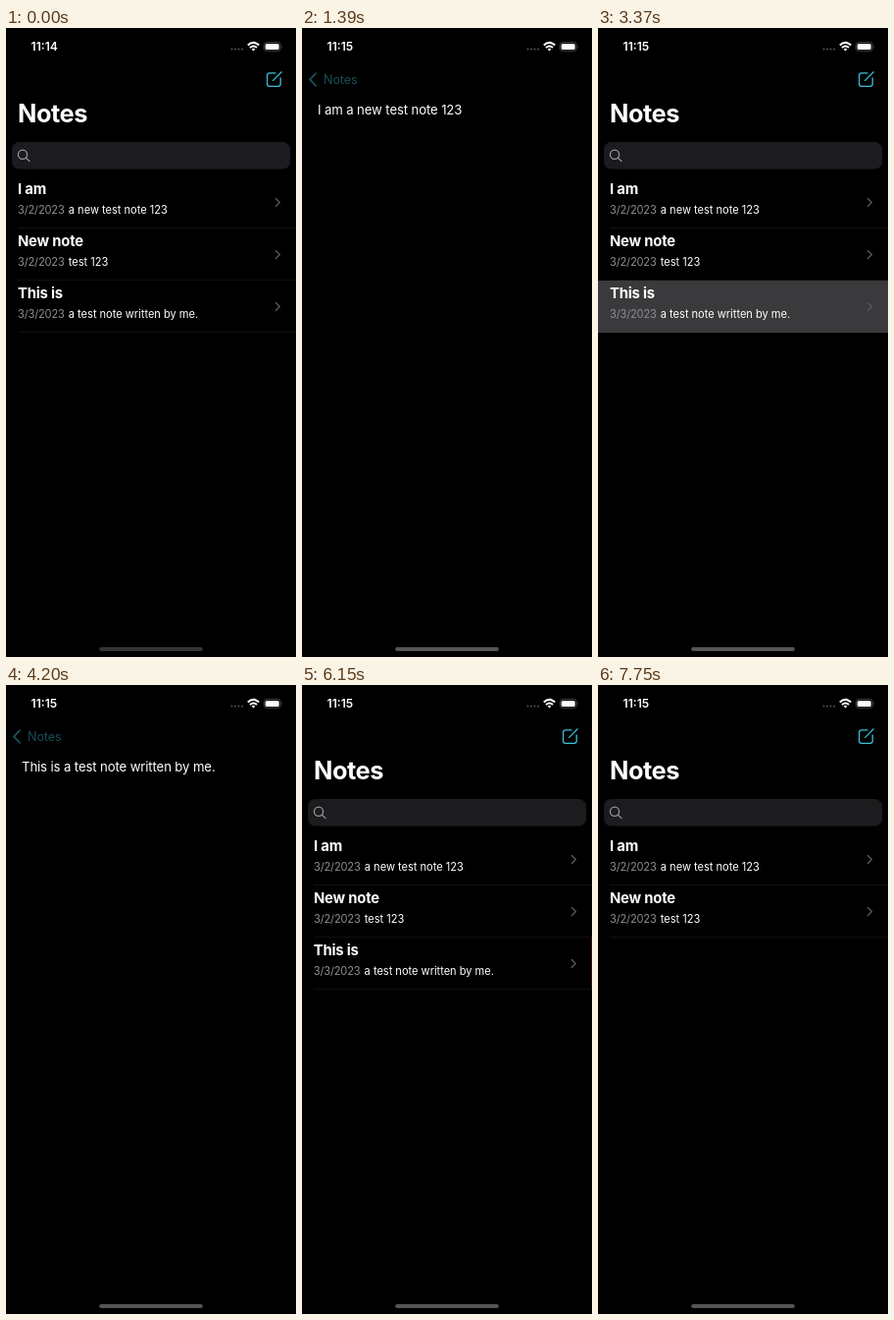
Animation, 296 px wide and 640 px high, one loop 8 s. Source, as an HTML page:

```html
<!DOCTYPE html>
<html lang="en">
<head>
<meta charset="utf-8">
<title>Notes</title>
<style>
  html, body { margin: 0; width: 100%; height: 100%; overflow: hidden; background: #000; }
  svg { display: block; }
  text { font-family: Inter, "Liberation Sans", sans-serif; fill: #fff; white-space: pre; }
  .large { font-size: 25.4px; font-weight: 700; letter-spacing: -.018em; }
  .nav { font-size: 12.6px; letter-spacing: -.008em; fill: #3cc4dc; }
  .head { font-size: 14.8px; font-weight: 700; letter-spacing: -.012em; }
  .detail { font-size: 11.1px; letter-spacing: -.002em; }
  .date { font-size: 11.1px; letter-spacing: -.016em; fill: #8e8e93; }
  .body { font-size: 13.2px; letter-spacing: -.01em; }
  .clock { font-size: 12.1px; font-weight: 600; }
  .action { font-size: 12.6px; letter-spacing: -.008em; text-anchor: middle; }
  .line { fill: none; stroke-linecap: round; stroke-linejoin: round; }
  .tint { stroke: #3cc4dc; }
</style>
</head>
<body>
<svg width="296" height="640" viewBox="0 0 296 640">
  <rect width="296" height="640"/>
  <g id="list">
    <rect x="6" y="116" width="284" height="27.5" rx="7.5" fill="#1c1c1e"/>
    <g class="line" stroke="#96969b" stroke-width="1.3">
      <circle cx="17" cy="128.7" r="4.6"/>
      <path d="M20.4 132.1L24 135.6"/>
    </g>
    <g id="rows"></g>
  </g>
  <g id="page">
    <rect width="296" height="640"/>
    <text id="body" class="body" x="16" y="88"></text>
  </g>
  <text id="large" class="large">Notes</text>
  <g id="back">
    <path id="arrow" class="line tint" stroke-width="1.9" d="M14.2 46.2L8 52.5L14.2 58.8"/>
    <text id="label" class="nav">Notes</text>
  </g>
  <g id="compose" class="line tint" stroke-width="1.25">
    <path d="M275 45.8H269Q266.6 45.8 266.6 48.2V57Q266.6 59.4 269 59.4H277.8Q280.2 59.4 280.2 57V50.8"/>
    <path d="M272.6 53.4L281.2 44.8"/>
  </g>
  <text id="clock" class="clock" x="25.6" y="23.1"></text>
  <g fill="#4a4a4d">
    <circle cx="230.5" cy="21.6" r="1.15"/>
    <circle cx="234" cy="21.6" r="1.15"/>
    <circle cx="237.5" cy="21.6" r="1.15"/>
    <circle cx="241" cy="21.6" r="1.15"/>
  </g>
  <g class="line" stroke="#fff" stroke-width="2" style="stroke-linecap:butt">
    <path d="M246.8 17.5Q252.5 12.3 258.2 17.5"/>
    <path d="M249 20Q252.5 16.900 256 20"/>
  </g>
  <path d="M250.700 21.500Q252.500 20 254.300 21.500L252.500 23.400Z" fill="#fff"/>
  <rect x="263.400" y="14.600" width="16.800" height="8.600" rx="2.600" fill="none" stroke="#5c5c5e" stroke-width=".8"/>
  <rect x="264.700" y="15.900" width="14" height="6" rx="1.500" fill="#fff"/>
  <path d="M281.200 17.500Q282.400 18.900 281.200 20.300Z" fill="#5c5c5e"/>
  <rect id="home" x="95.200" y="630.100" width="105.600" height="3.800" rx="1.900"/>
</svg>
<script>
const LOOP = 8000, TOP = 151, ROW = 53, ACTION = 56;

const notes = [
  ['I am', '3/2/2023', 'a new test note 123'],
  ['New note', '3/2/2023', 'test 123'],
  ['This is', '3/3/2023', 'a test note written by me.']
];

// moments at which the screen refreshes
const ticks = [0, 500, 610, 730, 840, 950, 1040, 1390, 1620, 1730, 1850, 1960,
  3370, 3480, 3590, 3710, 3820, 4200, 4310, 4420, 4540, 4650, 4760,
  6150, 6270, 6380, 6490, 6600, 6720, 6830, 6940, 7050, 7150, 7750];

// page changes: first visible tick, spring start, row, direction
const moves = [
  { at: 500, start: 530, row: 0, push: true },
  { at: 1620, start: 1590, row: 0, push: false },
  { at: 3370, start: 3385, row: 2, push: true },
  { at: 4310, start: 4290, row: 2, push: false }
];

const $ = id => document.getElementById(id);
const lerp = (a, b, k) => a + (b - a) * k;
const clamp = v => Math.max(0, Math.min(1, v));
const shift = (el, x, y = 0, s = 1) => el.setAttribute('transform', `translate(${x} ${y}) scale(${s})`);
const fade = (el, v) => el.setAttribute('opacity', clamp(v));
const within = (t, a, b) => t >= a && t < b;

function spring(ms, rate) {
  const k = Math.max(0, ms) / 1000 * rate;
  return 1 - (1 + k) * Math.exp(-k);
}

$('rows').innerHTML = notes.map(([head, date, detail], i) => `
  <g class="row" transform="translate(0 ${TOP + i * ROW})">
    <g class="action-box">
      <rect x="296" width="${ACTION}" height="${ROW}" fill="#ff453a"/>
      <text class="action" x="${296 + ACTION / 2}" y="31">Delete</text>
    </g>
    <path d="M12 52.5H296" stroke="#101011"/>
    <rect class="glow" width="296" height="${ROW}" fill="#3a3a3c"/>
    <g class="cell">
      <text class="head" x="12" y="18.3">${head}</text>
      <text class="date" x="12" y="38.2">${date}</text>
      <text class="detail" x="63.8" y="38.2">${detail}</text>
      <path class="line" stroke="#545458" stroke-width="1.5" d="M275.4 22.5L279.4 26.5L275.4 30.5"/>
    </g>
  </g>`).join('');

const rows = [...document.querySelectorAll('.row')];
const glows = [...document.querySelectorAll('.glow')];
const lastCell = rows[2].querySelector('.cell');
const lastAction = rows[2].querySelector('.action-box');

function draw(t) {
  const move = moves.filter(m => m.at <= t).pop();
  let open = 0, glow = 0;
  if (move) {
    const k = spring(t - move.start, 18.26);
    open = move.push ? k : 1 - k;
    glow = move.push ? 1 - .3 * open : .7 * open;
    $('body').textContent = notes[move.row][0] + ' ' + notes[move.row][2];
  }

  shift($('list'), -88 * open);
  shift($('page'), 296 * (1 - open));
  glows.forEach((g, i) => fade(g, move && move.row === i ? glow : 0));

  // the large title shrinks into the back button
  const x = lerp(12, 22, open), width = lerp(71, 34.5, open);
  shift($('large'), x, lerp(96.3, 57, open), width / 71);
  fade($('large'), 1 - 1.4 * open);
  shift($('label'), x, lerp(104, 57, open), width / 34.5);
  fade($('label'), open);
  fade($('arrow'), (open - .92) / .08);
  fade($('back'), within(t, 1390, 1620) || within(t, 4200, 4310) ? .4 : 1);
  fade($('compose'), Math.pow(1 - open, .8));

  const swipe = -ACTION * spring(t - 6140, 9);
  shift(lastCell, swipe);
  shift(lastAction, swipe);
  rows[2].setAttribute('visibility', t < 7750 ? 'visible' : 'hidden');

  $('clock').textContent = t < 1390 ? '11:14' : '11:15';
  $('home').setAttribute('fill', t < 500 ? '#343436' : '#555557');
}

const began = performance.now();
let shown = -1;

function frame() {
  const t = (performance.now() - began) % LOOP;
  const tick = ticks.filter(v => v <= t).pop() || 0;
  if (tick !== shown) draw(shown = tick);
  requestAnimationFrame(frame);
}

frame();
</script>
</body>
</html>
```
